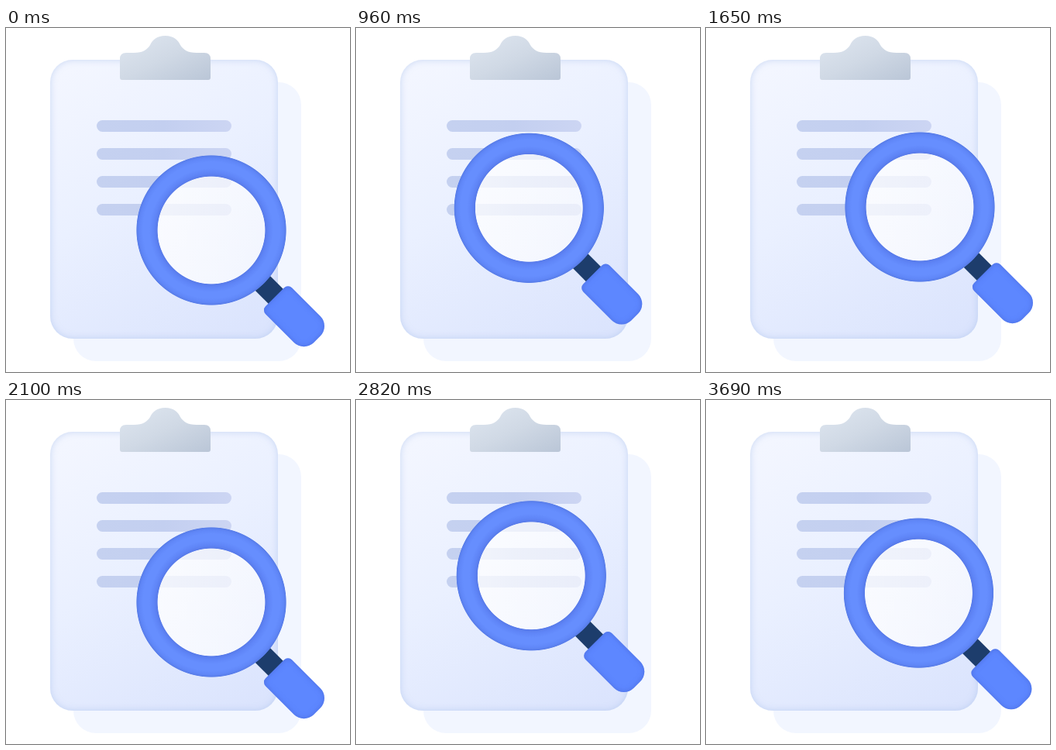
Recreate the animation shown at these times as an HTML page. Size 444 by 444 pixels, loop 3.72 s.

```html
<!DOCTYPE html>
<html>
<head>
<meta charset="utf-8">
<style>
  html, body { margin: 0; width: 100%; height: 100%; overflow: hidden; background: #fff; }
  div, svg { position: absolute; box-sizing: border-box; }
  .back, .paper { width: 294px; height: 360px; border-radius: 29px; }
  .back { left: 87px; top: 70px; background: #f2f6ff; }
  .paper {
    left: 57px; top: 41px;
    background: linear-gradient(150deg, #f3f6ff 5%, #eaf0ff 45%, #dbe4fd 95%);
    box-shadow: inset 0 0 9px rgba(160, 185, 232, .5);
  }
  .line {
    left: 117px; width: 174px; height: 15px; border-radius: 8px;
    background: linear-gradient(90deg, #c5d1f0, #c3cff0 50%, #ccd5f3);
  }
  /* The glass is placed by its centre */
  #glass { left: 0; top: 0; width: 0; height: 0; }
  .lens {
    left: -70px; top: -70px; width: 140px; height: 140px; border-radius: 50%;
    background: linear-gradient(90deg, rgba(255, 255, 255, .76), rgba(255, 255, 255, .58));
  }
  .ring {
    left: -98px; top: -98px; width: 196px; height: 196px;
    background: radial-gradient(circle closest-side at center,
      transparent 69px, #587bea 69.8px, #5f85f7 74px, #668efe 80px,
      #668efe 88px, #6087f8 93px, #587de9 96.2px, transparent 97px);
  }
  .arm { transform: rotate(45deg); }
  .neck { left: 95px; top: -12.5px; width: 28px; height: 27px; background: #1d3d6c; }
  .grip {
    left: 118.5px; top: -21.5px; width: 77.5px; height: 48px;
    border-radius: 7px 18px 18px 7px; background: #5d87ff;
    box-shadow: inset 0 0 7px rgba(65, 95, 205, .6);
  }
</style>
</head>
<body>
<div class="back"></div>
<div class="paper"></div>
<svg width="444" height="80">
  <defs>
    <linearGradient id="metal" x1="0" y1="0" x2="1" y2="1">
      <stop offset=".1" stop-color="#dce4ee"/>
      <stop offset=".5" stop-color="#d0d9e5"/>
      <stop offset="1" stop-color="#bac6d7"/>
    </linearGradient>
  </defs>
  <path fill="url(#metal)" d="M147 64V40Q147 32 155 32H165C177 32 182 28 186 22C189 15 195 10 205.500 10S222 15 225 22C229 28 234 32 246 32H256Q264 32 264 40V64Q264 67 261 67H150Q147 67 147 64Z"/>
</svg>
<div class="line" style="top:119px"></div>
<div class="line" style="top:155px"></div>
<div class="line" style="top:191px"></div>
<div class="line" style="top:227px"></div>
<div id="glass">
  <div class="lens"></div>
  <div class="arm"><div class="neck"></div><div class="grip"></div></div>
  <div class="ring"></div>
</div>
<script>
  const LOOP = 3720, HOLD = 300, TURN = 1800, STEP = 30;
  // Lens centres at equal intervals of one turn
  const path = [
    [265, 261], [251, 266.5], [234.5, 264], [222.7, 251.5], [221.5, 238], [228, 224.5],
    [239.5, 217], [254, 216], [267.5, 221], [276, 231], [277, 242.7], [272, 253]
  ];
  const glass = document.getElementById('glass');

  // Closed Catmull-Rom curve
  function pointAt(turns) {
    const n = path.length, pos = turns % 1 * n, i = Math.floor(pos), u = pos - i;
    const [a, b, c, d] = [-1, 0, 1, 2].map(k => path[(i + k + n) % n]);
    return [0, 1].map(k => b[k] + u / 2 * (c[k] - a[k]
      + u * (2 * a[k] - 5 * b[k] + 4 * c[k] - d[k]
      + u * (3 * (b[k] - c[k]) + d[k] - a[k]))));
  }

  function draw() {
    const t = Math.floor(performance.now() % LOOP / STEP) * STEP;
    const [x, y] = pointAt(Math.max(0, t - HOLD) / TURN);
    glass.style.transform = `translate(${x}px, ${y}px)`;
    requestAnimationFrame(draw);
  }
  draw();
</script>
</body>
</html>
```
